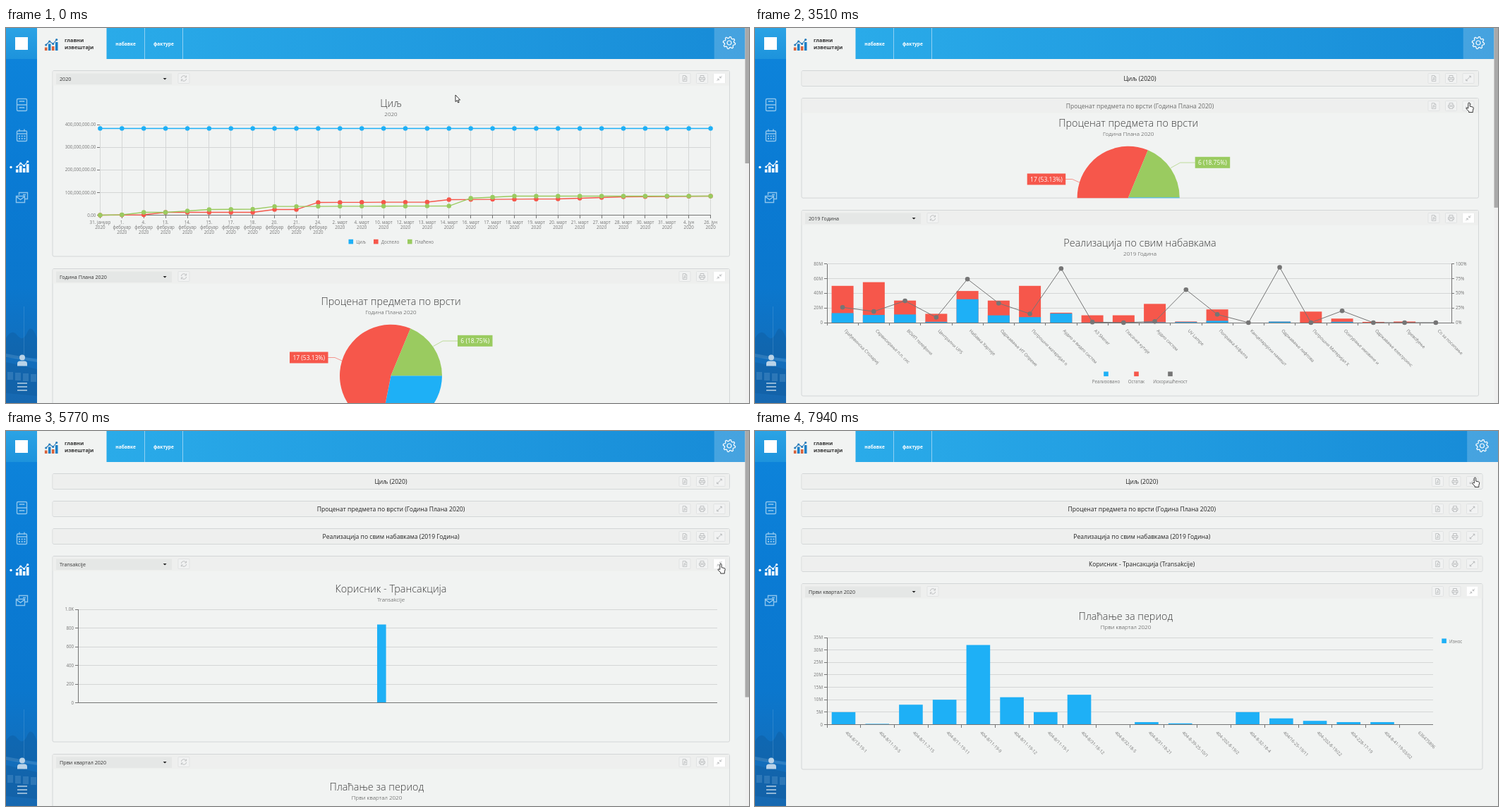
Write an HTML page that moves like this. It is 1053 px wide and 532 px high and loops after 8 s.

```html
<!DOCTYPE html>
<html lang="sr">
<head>
<meta charset="utf-8">
<style>
html, body { margin: 0; width: 100%; height: 100%; overflow: hidden; background: #f1f3f2; }
body > svg { display: block; width: 1053px; height: 532px; }
svg { overflow: hidden; }
text { font-family: "Open Sans", "Noto Sans", sans-serif; }
.mid { text-anchor: middle; }
.end { text-anchor: end; }
.light { font-weight: 300; }
.bold { font-weight: 700; }
.axis path { shape-rendering: crispEdges; }
</style>
</head>
<body>
<svg id="stage" viewBox="0 0 1053 532"></svg>
<script>
const BLUE = '#1eb0f6', RED = '#f6574b', GREEN = '#9acb60', GREY = '#757575', GRID = '#d4d6d6';
const FULL = 263.5, FOLDED = 22, GAP = 17, FOLD_MS = 680;

const rect = (x, y, w, h, fill, more = '') =>
  `<rect x="${x}" y="${y}" width="${w}" height="${h}" fill="${fill}" ${more}/>`;
const text = (x, y, s, size = 6.2, fill = GREY, cls = '', more = '') =>
  `<text x="${x}" y="${y}" font-size="${size}" fill="${fill}" class="${cls}" ${more}>${s}</text>`;
const path = (d, stroke, width = 1, fill = 'none') =>
  `<path d="${d}" stroke="${stroke}" stroke-width="${width}" fill="${fill}"/>`;
const dot = (x, y, r, fill) => `<circle cx="${x}" cy="${y}" r="${r}" fill="${fill}"/>`;
const group = (x, y, body) => `<g transform="translate(${x} ${y})">${body}</g>`;
const axis = body => `<g class="axis">${body}</g>`;
const each = (list, fn) => list.map(fn).join('');
const count = n => [...Array(n).keys()];

// ---- chart parts, y measured from the panel top ----
const heading = (x, title, sub) =>
  text(x, 51, title, 14.4, '#3c3c3c', 'mid light') + text(x, 64, sub, 8, '#3c3c3c', 'mid light');

const legend = items => each(items, ([x, color, name]) =>
  rect(x, 239.3, 6.6, 6.6, color) + text(x + 10.7, 245.4, name));

// n equal steps from zero, named by a function of the step
const yAxis = (x0, x1, top, base, n, name) => axis(each(count(n + 1), i => {
  const y = base - i * (base - top) / n;
  return path(`M${x0} ${y}H${x1}`, GRID) + path(`M${x0 - 4} ${y}h4`, GREY) +
    text(x0 - 6, y + 2.2, name(i), 6.2, GREY, 'end');
}) + path(`M${x0} ${top}V${base}`, GREY));

const xAxis = (x0, x1, base, names) => {
  const step = (x1 - x0) / names.length;
  return axis(path(`M${x0} ${base}H${x1}`, GREY) + each(names, (s, i) =>
    path(`M${x0 + i * step} ${base}v4`, GREY) +
    text(0, 0, s, 6.2, GREY, '', `transform="translate(${x0 + (i + .5) * step + 2} ${base + 12}) rotate(45)"`)));
};

const series = (pts, color, width, r) =>
  path('M' + pts.map(p => p.join(' ')).join('L'), color, width) + each(pts, p => dot(...p, r, color));

// straight lines through a few [x, y] points
function curve(points, x) {
  const i = points.findIndex(p => p[0] >= x);
  if (i < 1) return points[0][1];
  const [[x0, y0], [x1, y1]] = points.slice(i - 1, i + 1);
  return y0 + (y1 - y0) * (x - x0) / (x1 - x0);
}

function goalChart() {
  const months = { јануар: '31', фебруар: '1 4 13 14 15 17 18 20 21 24',
    март: '2 4 10 12 13 14 16 17 18 19 20 21 27 28 30 31', јун: '4 26' };
  const days = Object.entries(months).flatMap(([m, list]) =>
    list.split(' ').map(d => m == 'фебруар' ? [d + '.', m, '2020'] : [`${d}. ${m}`, '2020']));
  const base = 205, x = i => 133.4 + i * 30.9;
  const plot = (points, color) => series(days.map((_, i) => [x(i), base - curve(points, i)]), color, 1.3, 3.2);
  return heading(545.5, 'Циљ', '2020') +
    yAxis(133.4, 998.5, 76.5, base, 4, i => i ? i + '00,000,000.00' : '0.00') +
    each(days, (lines, i) =>
      axis(path(`M${x(i)} 76.5V${base}`, GRID) + path(`M${x(i)} ${base}v4`, GREY)) +
      each(lines, (s, k) => text(x(i), 217.6 + k * 6.7, s, 6.2, GREY, 'mid'))) +
    axis(path(`M133.4 ${base}H998.5`, GREY)) +
    plot([[0, 123], [28, 123]], BLUE) +
    plot([[0, 0], [2, .5], [3, 4], [7, 4], [8, 8], [9, 8], [10, 18], [15, 18.5], [16, 22], [21, 23], [24, 26], [28, 27]], RED) +
    plot([[0, 0], [1, .5], [2, 4], [3, 4], [5, 8], [7, 8.5], [8, 12.3], [16, 13], [17, 24], [19, 27], [28, 27]], GREEN) +
    legend([[485.5, BLUE, 'Циљ'], [521, RED, 'Доспело'], [569, GREEN, 'Плаћено']]);
}

function pieChart() {
  const cx = 545.5, cy = 151.8, r = 72.5, total = 32;
  const rim = n => {
    const a = n / total * 2 * Math.PI;
    return `${cx + r * Math.cos(a)} ${cy + r * Math.sin(a)}`;
  };
  const slice = (a, b, color) =>
    path(`M${cx} ${cy}L${rim(a)}A${r} ${r} 0 ${+(b - a > total / 2)} 1 ${rim(b)}Z`, 'none', 0, color);
  const tag = (x, y, w, s, color, lead) =>
    path(lead, color, .6) + rect(x, y, w, 16, color) + text(x + w / 2, y + 11.2, s, 8.5, '#fff', 'mid');
  return heading(cx, 'Проценат предмета по врсти', 'Година Плана 2020') +
    slice(0, 9, BLUE) + slice(9, 26, RED) + slice(26, 32, GREEN) +
    tag(640, 94.3, 49.5, '6 (18.75%)', GREEN, 'M605.5 110L619 102.5H640') +
    tag(402, 118, 54.5, '17 (53.13%)', RED, 'M476 130.5L466 126H456') +
    tag(640, 213, 49.5, '9 (28.13%)', BLUE, 'M591 208.5L602 221.5H640') +
    legend([[488, BLUE, 'Добра'], [529.7, RED, 'Услуге'], [571, GREEN, 'Радови']]);
}

function purchaseChart() {
  const names = ('Грађевинска Столариј|Сервисирање п.п. сис|ВОИП телефони|Централни UPS|Набавка Хартије|' +
    'Одржавање ИТ Опреме|Потрошни материјал о|Аудио и видео систем|A3 Skener|Гласачке кутије|Аудио систем|' +
    'UV Lampe|Поправка Асфалта|Канцеларијски намешт|Одржавање лифтова|Потрошни Материјал Х|' +
    'Осигурање имовине и|Одржавање електроинс|Превођење|Со за посипање').split('|');
  const total = [50, 55, 30, 12, 43, 30, 50, 13.5, 10, 10, 25.5, 1.6, 18, 0, 1.5, 15, 5.5, 1, 1.5, 0];
  const used = [26, 19, 37, 9, 74, 33, 15, 92, 1, 0, 2, 56, 14, 0, 94, 0, 20, 0, 0, 0];
  const top = 76, base = 159.5, x = i => 124.1 + i * 44.25;
  const bar = (i, v, color) => rect(x(i) - 15.5, base - v * 1.044, 31, v * 1.044, color);
  const share = v => base - v * .835;
  return heading(545.5, 'Реализација по свим набавкама', '2019 Година') +
    yAxis(102, 987, top, base, 4, i => i ? i * 20 + 'M' : '0') +
    each(total, (v, i) => bar(i, v, RED) + bar(i, v * used[i] / 100, BLUE)) +
    xAxis(102, 987, base, names) +
    axis(path(`M987 ${top}V${base}`, GREY) + each([0, 25, 50, 75, 100], v =>
      path(`M987 ${share(v)}h4`, GREY) + text(993, share(v) + 2.2, v + '%'))) +
    series(used.map((v, i) => [x(i), share(v)]), GREY, 1, 3.3) +
    each([[497.5, BLUE, 'Реализовано'], [540.5, RED, 'Остатак'], [588.5, GREY, 'Искоришћеност']], ([mid, color, s]) =>
      rect(mid - 3.3, 229, 6.6, 6.6, color) + text(mid, 245, s, 6.2, GREY, 'mid'));
}

const userChart = () =>
  heading(545.5, 'Корисник - Трансакција', 'Transakcije') +
  yAxis(102, 1008, 75.5, 208, 5, i => i < 5 ? i * 200 : '1.0K') +
  rect(526, 97, 12.6, 111, BLUE) + axis(path('M102 208H1008', GREY));

function paymentChart() {
  const names = ('8/13-19-1 8/11-19-5 8/11-7-15 8/11-19-11 8/11-19-9 8/11-19-12 8/11-19-1 8/31-18-12 8/32-18-5 ' +
    '8/31-18-21 8-39-25-10/1 202-8-19/2 8-32-18-4 16-25-19/11 202-8-19/22 228-17-19 8-41-19-03/02')
    .split(' ').map(s => (s[0] == '1' ? '404/' : '404-') + s);
  const paid = [5, .3, 8, 10, 32, 11, 5, 12, 0, 1, .5, 0, 5, 2.5, 1.5, 1, 1];
  const base = 200, k = 123.5 / 35;
  return heading(525.5, 'Плаћање за период', 'Први квартал 2020') +
    yAxis(102, 961, 76.5, base, 7, i => i ? i * 5 + 'M' : '0') +
    each(paid, (v, i) => rect(108.7 + i * 47.72, base - v * k, 33.6, v * k, BLUE)) +
    xAxis(102, 961, base, [...names, '636475896']) +
    rect(973.3, 78, 6.6, 6.6, BLUE) + text(984, 84, 'Износ');
}

// ---- panels ----
const panels = [
  ['2020', 'Циљ (2020)', goalChart()],
  ['Година Плана 2020', 'Проценат предмета по врсти (Година Плана 2020)', pieChart()],
  ['2019 Година', 'Реализација по свим набавкама (2019 Година)', purchaseChart()],
  ['Transakcije', 'Корисник - Трансакција (Transakcije)', userChart()],
  ['Први квартал 2020', '', paymentChart()]
];
const ICON = '#bfc1c2';
const button = (x, body) =>
  group(x, 11, rect(-8, -7, 16, 14, '#f1f2f2', 'stroke="#e1e3e3" rx="1"') + body);
const pdfIcon = path('M-2.8-4H1L2.8-2.2V4H-2.8ZM1-4V-2.2H2.8M-1.4 2.2Q.5 0 0-1.6Q0 .6 1.6 1.2Z', ICON, .9);
const printIcon = path('M-2.5-1V-4H2.5V-1M-2.5 2H-4V-1H4V2H2.5M-2.5 1H2.5V4H-2.5Z', ICON);
const refreshIcon = path('M-3.6-.5A3.6 3.6 0 0 1 3-2.2M3.6-4V-1.5H1.2M3.6.5A3.6 3.6 0 0 1-3 2.2M-3.6 4V1.5H-1.2', ICON);
const shrinkIcon = path('M3.6-3.6L.8-.8M.8-3V-.8H3M-3.6 3.6L-.8.8M-.8 3V.8H-3', '#b4b6b7', .9);
const growIcon = path('M-3.3 3.3L3.3-3.3M1-3.3H3.3V-1M-1 3.3H-3.3V1', '#b4b6b7', .9);

const panel = ([choice, title, chart]) => `<g class="panel">
  <rect class="frame" x="66" rx="2" fill="#f1f3f2" stroke="#d3d6d7"/>
  <rect class="strip" x="66.5" y=".5" height="20.5" fill="#eeefee"/>
  <svg class="body" width="1053"><g class="chart">${chart}</g></svg>
  <g class="pick">${rect(71, 4, 164, 15.5, '#e5e7e6')}${text(76, 14.2, choice, 7.2, '#333')}
    <path d="M222.6 10.4h5l-2.5 2.6z" fill="#222"/>${button(252, refreshIcon)}</g>
  ${text(545.5, 14.6, title, 8.6, '#222', 'name mid')}
  <g class="tools">${button(962, pdfIcon)}${button(986.5, printIcon)}${button(1011, `<g class="grow">${growIcon}</g>`)}
    <g class="shrink" transform="translate(1011 11)">${rect(-8, -7, 16, 14, '#fff')}${shrinkIcon}</g></g>
</g>`;

// ---- page frame ----
const barIcon = (x, y, a, b, line) => {
  const peaks = [[1.7, 9], [6.7, 4], [11.7, 7.5], [16.7, 1.5]];
  return group(x, y, each(peaks, ([px, py], i) => rect(px - 1.8, py + 3.5, 3.6, 13.5 - py, i % 2 ? b : a)) +
    path('M' + peaks.join('L'), line, 1.1) + each(peaks, p => dot(...p, 1.6, line)));
};

const gear = 'M' + count(32).map(i => {
  const a = (i + .5) * Math.PI / 16, r = i % 4 < 2 ? 8.7 : 6.7;
  return [r * Math.cos(a), r * Math.sin(a)];
}).join('L') + 'Z';

const fade = (id, dir, ...stops) => `<linearGradient id="${id}" ${dir}>` + each(stops, (c, i) =>
  `<stop offset="${i / (stops.length - 1)}" stop-color="${c}"/>`) + '</linearGradient>';
const down = 'x2="0" y2="1"';

const chrome = `
  <defs>${fade('bar', '', '#2aabe9', '#178bd7')}${fade('mark', down, '#2ba3e5', '#1d93dc')}
    ${fade('side', down, '#0d83da', '#0a7bd4', '#0b77cd', '#1768b0')}</defs>
  ${rect(0, 44, 44, 488, 'url(#side)')}
  <g fill="#0f5796" opacity=".35">
    <path d="M0 440Q8 426 16 436T30 432T44 440V468H0Z"/>
    <path d="M0 474L44 484V522L0 518Z"/>
  </g>
  <g opacity=".22">
    <path d="M25 395h1v85h-1zM0 462L44 470V474L0 467Z" fill="#8fc0e6"/>
    ${each(count(4), i => rect(2 + i * 11, 488 + i, 8, 11, '#8fc0e6'))}
  </g>
  ${rect(0, 0, 44, 44, 'url(#mark)')}${rect(13, 13, 18, 18, '#fff')}
  ${rect(142, 0, 911, 44, 'url(#bar)')}${rect(44, 0, 98.5, 44, '#f1f3f2')}
  ${barIcon(55, 15, '#d9623b', '#1b7fc6', '#2a7dbb')}
  ${text(83, 19.8, 'главни', 7.3, '#333', 'bold')}${text(83, 30.3, 'извештаји', 7.3, '#333', 'bold')}
  ${text(155.3, 24.6, 'набавке', 6.6, '#fff', 'bold')}${text(209, 24.6, 'фактуре', 6.6, '#fff', 'bold')}
  ${path('M196.5 0V44M250.5 0V44', '#8fd0f3')}
  <g id="gear">${rect(1003.7, 0, 50, 44, '#fff', 'opacity=".2"')}
    ${group(1025, 21, path(gear, '#fff', 1.2) + '<circle r="3" fill="none" stroke="#fff" stroke-width="1.2"/>')}</g>
  <g fill="none" stroke="#8cc4ec" stroke-width="1.4">
    <rect x="15.5" y="100.5" width="14" height="17" rx="1.5"/><path d="M15.5 109H29.5M19.5 105V104H25.5V105M19.5 114V113H25.5V114"/>
    <rect x="15.5" y="146" width="14" height="14.5" rx="1.5"/><path d="M15.5 150H29.5M19 143.5V147M26 143.5V147"/>
    <path d="M18 153.5H27.5M18 157H27.5" stroke-width="1.8" stroke-dasharray="2 1.7"/>
    <path d="M18.5 237V233.5H30.5V242.5H27M14.5 238.5H26.5V247.5H14.5ZM14.5 239L20.5 243.5L26.5 239M24 236.5H28"/>
  </g>
  ${barIcon(14, 188, '#fff', '#fff', '#fff')}${dot(7, 197.5, 1.7, '#fff')}
  ${dot(23, 467.5, 4, '#b9d3e8')}<path d="M16 479.5V476Q16 472.5 20 472.5H26Q30 472.5 30 476V479.5Z" fill="#b9d3e8"/>
  ${path('M16 504H30M16 509H30M16 514H30', '#8fb6d6', 1.8)}`;

const ink = 'stroke="#222" stroke-width=".9" stroke-linejoin="round" fill="#fff"';
const stage = document.getElementById('stage');
stage.innerHTML = each(panels, panel) + chrome + `
  <g id="scroll">${rect(1047.5, 0, 6, 532, '#efefef')}<rect id="thumb" x="1047.5" width="6" fill="#a9a9a9"/></g>
  <g id="tip"><rect height="12.5" fill="#fff" stroke="#6b6b6b" stroke-width=".9"/>${text(0, 8.5, '', 6.2, '#555', 'mid')}</g>
  <g id="cursor"><path id="arrow" d="M0 0V9.6L2.2 7.6L3.7 11L5.2 10.3L3.7 7.1H6.6Z" ${ink}/>
  <path id="hand" d="M-1.2 8V1.2a1.2 1.2 0 0 1 2.4 0V5.2l3.8.8q1.3.4 1.2 1.8l-.9 3.6v2.2h-5.6v-1.6L-3.9 8.8q-.5-1.4.9-1.4Z" ${ink}/></g>`;

// ---- motion ----
const $ = id => document.getElementById(id);
const set = (el, attrs) => { for (const k in attrs) el.setAttribute(k, attrs[k]); };
const show = (el, on) => el.style.display = on ? '' : 'none';
const clamp = v => Math.max(0, Math.min(1, v));

const foldStarts = [2006, 3169, 4495, 5786, Infinity];
const stalls = [[4690, 5000], [5780, 6000]];   // folding stands still, then catches up
const glides = [                               // from, to, x, y, sag
  [630, 1610, 1011, 69.5, 65],
  [2700, 3260, 1012, 106, 0],
  [3890, 4300, 1010, 143, 0],
  [5200, 5770, 1013, 188.5, 0],
  [7010, 7940, 1020.5, 66, 0]
];
const tips = [[2300, 2700], [4830, 5200], [6200, 6450], [6780, 7010]];

function pointer(t) {
  let x = 637, y = 95;
  for (const [from, to, tx, ty, sag] of glides) {
    const k = Math.sin(clamp((t - from) / (to - from)) * Math.PI / 2);
    x += (tx - x) * k;
    y += (ty - y) * k + sag * Math.sin(Math.PI * k);
  }
  return [x, y];
}

const parts = [...stage.querySelectorAll('.panel')].map(el => {
  const part = { el };
  for (const c of ['frame', 'strip', 'body', 'chart', 'pick', 'name', 'tools', 'grow', 'shrink'])
    part[c] = el.querySelector('.' + c);
  return part;
});

function draw(now) {
  const t = now % 8000;
  const stall = stalls.find(([a, b]) => t >= a && t < b);
  const spent = foldStarts.map(s => clamp(((stall ? stall[0] : t) - s) / FOLD_MS));
  const heights = spent.map(e => FULL - (FULL - FOLDED) * (1 - Math.cos(Math.PI * e)) / 2);
  const page = 156.5 + heights.reduce((a, b) => a + b);
  const scrolls = page > 532, extra = scrolls ? 0 : 5.5;

  let y = 60.5;
  parts.forEach((p, i) => {
    const height = heights[i], open = !spent[i];
    set(p.el, { transform: `translate(0 ${Math.floor(y) + .5})` });
    set(p.frame, { height, width: 959.5 + extra });
    set(p.strip, { width: 958.5 + extra });
    set(p.body, { height });
    set(p.chart, { transform: open ? '' : 'translate(-16.3 -11)' });
    show(p.chart, spent[i] < 1);
    show(p.pick, open);
    show(p.shrink, open);
    show(p.grow, !open);
    set(p.name, { x: 545.5 + extra / 2, opacity: clamp((spent[i] - .26) / .38) });
    set(p.tools, { transform: `translate(${extra} 0)` });
    y += height + GAP;
  });

  show($('scroll'), scrolls);
  set($('thumb'), { height: 532 * 532 / page });
  set($('gear'), { transform: `translate(${extra} 0)` });

  const [mx, my] = pointer(t);
  const overButton = mx > 1002 && (my - 61) % 39 < 22;
  set($('cursor'), { transform: `translate(${mx} ${my})` });
  show($('hand'), overButton);
  show($('arrow'), !overButton);

  const [box, words] = $('tip').children;
  const label = scrolls ? 'Смањи' : 'Прошири', width = 8.5 + 4.3 * label.length;
  show($('tip'), tips.some(([a, b]) => t >= a && t < b));
  set($('tip'), { transform: `translate(${Math.min(mx + 5, 1052.5 - width)} ${my + 9.7})` });
  set(box, { width });
  set(words, { x: width / 2 });
  words.textContent = label;
}

function loop() {
  draw(performance.now());
  requestAnimationFrame(loop);
}
loop();
</script>
</body>
</html>
```
